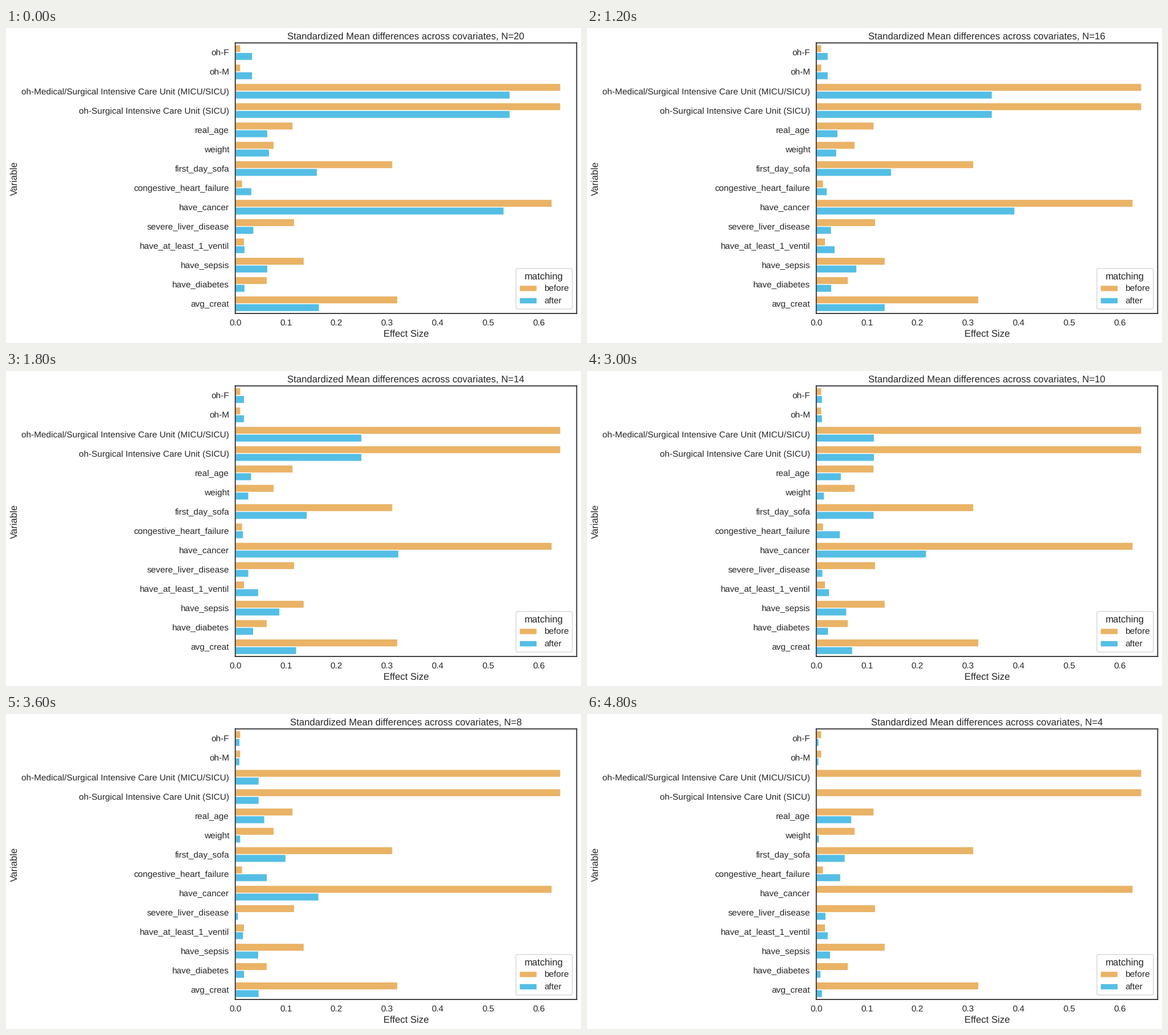
A matplotlib script that plays this animation: 1010 px wide and 555 px high, repeating every 5.4 s.

```python
import numpy as np
import matplotlib.pyplot as plt
from matplotlib.animation import FuncAnimation

W, H, DPI = 1010, 555, 100
INK, ORANGE, BLUE = "#262626", "#EAB366", "#54BEE5"
BIG, SMALL = 12.1, 11.09
LEFT, RIGHT, TOP, BOTTOM = 402.7, 1002.4, 26.3, 502.9
SIZES = range(20, 2, -2)

plt.rcParams.update({
    "font.family": "Liberation Sans",
    "text.color": INK,
    "text.hinting": "none",
    "axes.edgecolor": INK,
    "axes.linewidth": 1.25,
    "path.snap": False,
})

# Effect sizes in thousandths: before matching, then after it at each key N.
KEY_N = (4, 8, 14, 20)
SEX = 10.5, (5, 9, 18, 34)
UNIT = 643, (1.5, 47, 250, 543)
EFFECTS = {
    "oh-F": SEX,
    "oh-M": SEX,
    "oh-Medical/Surgical Intensive Care Unit (MICU/SICU)": UNIT,
    "oh-Surgical Intensive Care Unit (SICU)": UNIT,
    "real_age": (114, (70, 58, 32, 64)),
    "weight": (76.5, (6, 10.5, 26.5, 67.5)),
    "first_day_sofa": (311, (57, 100, 142, 162)),
    "congestive_heart_failure": (14, (48, 63, 16, 32.5)),
    "have_cancer": (626, (0, 165, 323, 531)),
    "severe_liver_disease": (117, (19, 6, 26.5, 36.5)),
    "have_at_least_1_ventil": (18, (23.5, 16, 46, 19)),
    "have_sepsis": (136, (28, 46, 88, 64)),
    "have_diabetes": (63, (9, 18, 36, 19)),
    "avg_creat": (321, (12, 47, 121, 166)),
}


def after_sizes(n):
    """Effect sizes after matching, eased between the key values of N."""
    return [np.interp(n, KEY_N, keys) / 1000 for _, keys in EFFECTS.values()]


def put(x, y, text, **style):
    """Place text centred on x with its baseline at y, in pixels from the top left."""
    return fig.text(x / W, 1 - y / H, text, fontsize=BIG,
                    ha="center", va="baseline", **style)


def draw_bars(offset, sizes, color, label):
    return ax.barh(rows + offset, sizes, height=0.4, color=color,
                   edgecolor="white", linewidth=1, label=label)


fig = plt.figure(figsize=(W / DPI, H / DPI), dpi=DPI, facecolor="white")
ax = fig.add_axes([LEFT / W, 1 - BOTTOM / H,
                   (RIGHT - LEFT) / W, (BOTTOM - TOP) / H])
rows = np.arange(len(EFFECTS))
draw_bars(-0.2, [size / 1000 for size, _ in EFFECTS.values()], ORANGE, "before")
after = draw_bars(0.2, after_sizes(SIZES[0]), BLUE, "after")

ax.set_xlim(0, 0.6748)
ax.set_ylim(len(rows) - 0.5, -0.5)
ax.set_xticks(np.arange(7) / 10, [f"{i / 10:.1f}" for i in range(7)])
ax.set_yticks(rows, list(EFFECTS))
ax.tick_params(length=0, pad=7.5, labelsize=SMALL, labelcolor=INK)
ax.legend(title="matching", loc="lower right",
          fontsize=SMALL, title_fontsize=BIG)

mid_x, mid_y = (LEFT + RIGHT) / 2, (TOP + BOTTOM) / 2
title = put(mid_x, 20.2, "")
put(mid_x, 544, "Effect Size")
put(20.2, mid_y, "Variable", rotation=90, rotation_mode="anchor")


def update(i):
    n = SIZES[i]
    for bar, size in zip(after, after_sizes(n)):
        bar.set_width(size)
    title.set_text(f"Standardized Mean differences across covariates, N={n}")
    return [title, *after]


anim = FuncAnimation(fig, update, frames=len(SIZES), interval=600,
                     repeat=True, repeat_delay=0)
plt.show()
```
